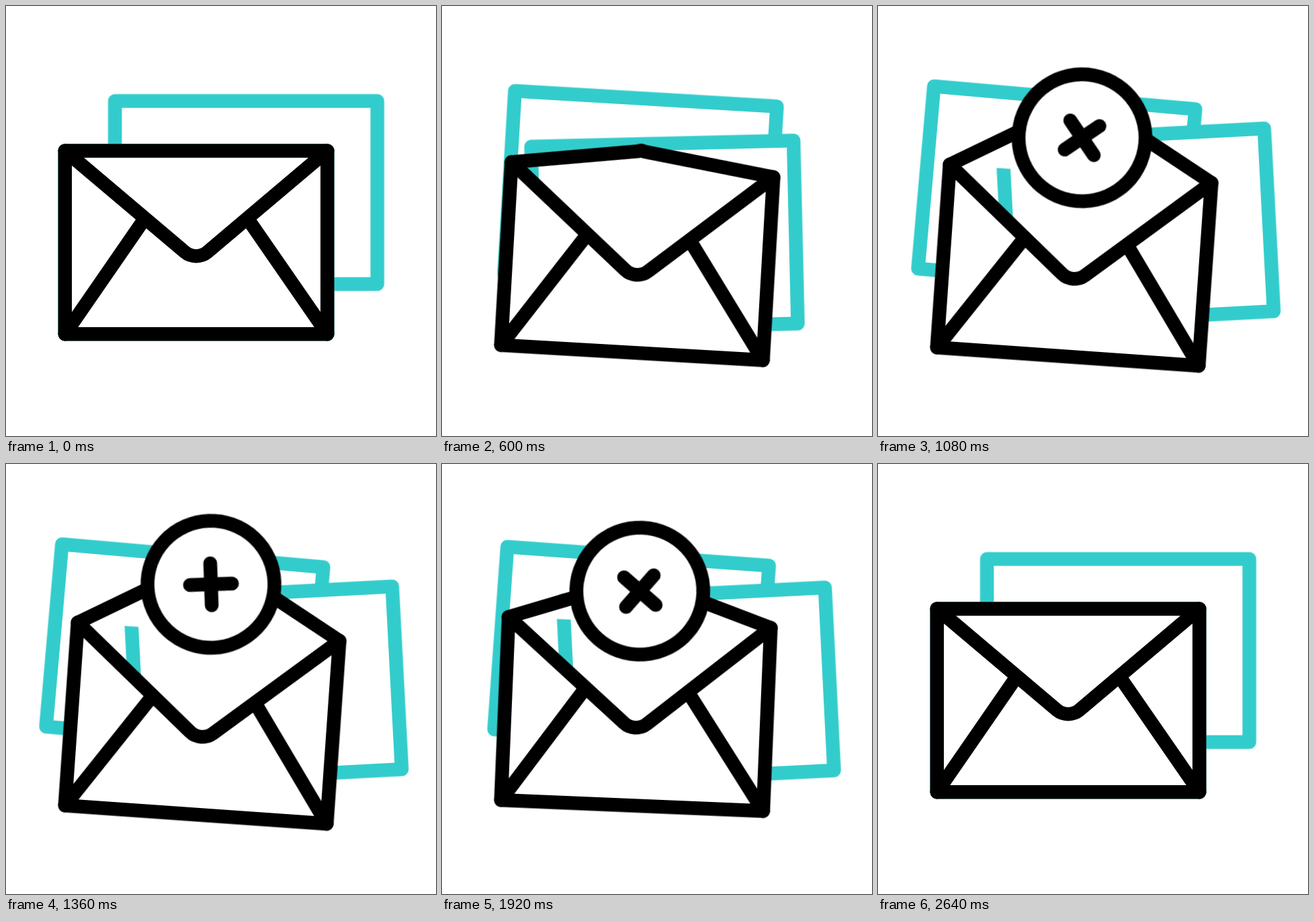
Recreate the animation shown at these times as an HTML page. Size 640 by 640 pixels, loop 2.8 s.

```html
<!DOCTYPE html>
<html lang="en">
<head>
<meta charset="utf-8">
<title>Envelope</title>
<style>
  html, body { margin: 0; height: 100%; overflow: hidden; background: #fff; }
  svg { display: block; width: 100%; height: 100%; }
  path, rect, circle {
    fill: #fff; stroke: #000; stroke-width: 20.5;
    stroke-linecap: round; stroke-linejoin: round;
  }
  .card rect { stroke: #3cc; }
  .line { fill: none; }

  .back, .mid, .mid rect, .mail, .flap, .badge {
    animation: 2800ms cubic-bezier(.65, 0, .35, 1) infinite;
  }
  .back { animation-name: back; }
  .mid { animation-name: mid-move; }
  .mid rect { animation-name: mid-turn; }
  .mail { animation-name: mail; transform-origin: 88px 488px; }
  .flap { animation-name: flap; }
  .badge { animation-name: badge; }

  @keyframes back {
    0%, 6.79%, 84.79%, 100% { transform: translate(357.4px, 277.6px) rotate(0deg); }
    32.68%, 59.71% { transform: translate(266px, 272.2px) rotate(5deg); }
  }
  @keyframes mid-move {
    0%, 8.07%, 91.75%, 100% { transform: translate(283.05px, 351.8px); }
    35.57%, 62.21% { transform: translate(386.9px, 328.5px); }
  }
  @keyframes mid-turn {
    0%, 8.57%, 85.11%, 100% { transform: rotate(0deg); }
    35.36%, 64.04% { transform: rotate(-3deg); }
  }
  @keyframes mail {
    0%, 7.14%, 82.75%, 100% { transform: translateY(0) rotate(0deg); }
    29.29%, 56.32% { transform: translateY(20px) rotate(4deg); }
  }
  @keyframes flap {
    0%, 12.32%, 94.29%, 100% {
      d: path("M87.8 215.4 L278.5 215.4 Q278.5 215.4 278.5 215.4 L478.3 215.4");
    }
    34.82%, 54.29% {
      d: path("M87.8 215.4 L266.4 113.4 Q282.4 104.3 298.4 113.4 L478.3 215.4");
      animation-timing-function: cubic-bezier(.47, 0, .27, 1);
    }
  }
  @keyframes badge {
    0%, 7.14%, 93.18%, 100% {
      transform: translate(277.5px, 530px) rotate(-726deg);
      animation-timing-function: cubic-bezier(.735, 0, .22, 1);
    }
    48.57%, 60.93% {
      transform: translate(281.6px, 144.7px) rotate(-6deg);
      animation-timing-function: cubic-bezier(.65, 0, .35, 1);
    }
  }
</style>
</head>
<body>
<svg viewBox="0 0 640 640">
  <clipPath id="inside"><path d="M0 -99H640V488H0z"/></clipPath>

  <g class="card back"><rect x="-195.3" y="-136.3" width="390.6" height="272.6"/></g>
  <g class="card mid"><rect x="-195.3" y="-136.3" width="390.6" height="272.6"/></g>

  <g class="mail">
    <path class="flap" d="M87.8 215.4 L278.5 215.4 Q278.5 215.4 278.5 215.4 L478.3 215.4"/>
    <g clip-path="url(#inside)">
      <g class="badge">
        <circle r="94.5"/>
        <path class="line" d="M-31.3 0H31.3M0 -31.3V31.3"/>
      </g>
    </g>
    <path d="M87.8 215.4V488.2H478.3V215.4L300 366c-9.8 8.3 -24.2 8.3 -34 0z"/>
    <path class="line" d="M87.8 488.2L205 318.5M478.3 488.2L361 318.5"/>
  </g>
</svg>
</body>
</html>
```
